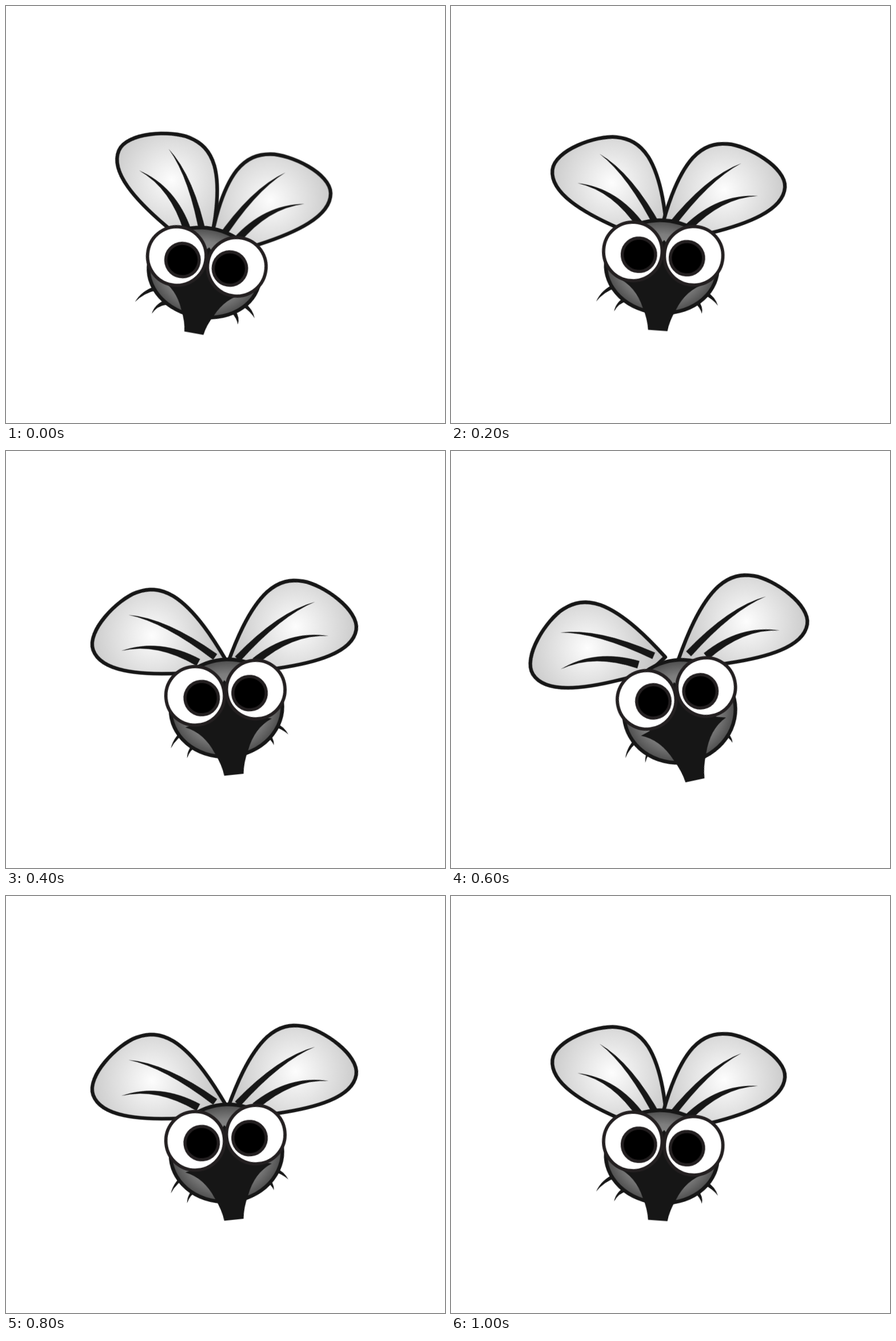
These frames come from a looping animation (768 by 729 pixels, 1200 ms). An HTML page:

```html
<!DOCTYPE html>
<html lang="en">
<head>
<meta charset="utf-8">
<title>Fly</title>
<style>
  html, body { margin: 0; width: 100%; height: 100%; overflow: hidden; background: #fff; }
  svg { display: block; width: 768px; height: 729px; }
  .ink { fill: #161616; }
  .line { stroke: #161616; stroke-width: 6.4; stroke-linejoin: round; }
  .eye { fill: #fff; stroke: #231f20; stroke-width: 5.8; }
  .pupil { fill: #000; stroke: #231f20; stroke-width: 5.5; }
</style>
</head>
<body>
<svg viewBox="0 0 768 729">
  <defs>
    <radialGradient id="wingFill" gradientUnits="userSpaceOnUse" cx="-43" cy="21" r="122">
      <stop offset="0" stop-color="#fdfdfd"/>
      <stop offset="1" stop-color="#c4c4c4"/>
    </radialGradient>
    <radialGradient id="skin">
      <stop offset="0" stop-color="#999"/>
      <stop offset=".7" stop-color="#7d7d7d"/>
      <stop offset="1" stop-color="#4c4c4c"/>
    </radialGradient>
    <g id="wing">
      <path class="line" fill="url(#wingFill)" d="M-150 106C-143 68 -130 5 -102 -31C-84 -53 -65 -59.5 -43 -59.5C-8 -59.5 62.5 -26 62.5 9C62.5 50 0 78 -62 98L-110 114Z"/>
      <path class="ink" d="M-16.5 -27.5Q-77 0 -139 90L-129 97Q-71 6 -16.5 -27.5Z"/>
      <path class="ink" d="M16.5 27.5Q-54 28 -108 88L-98 97Q-47 35 16.5 27.5Z"/>
    </g>
  </defs>

  <g id="leftWing"><use href="#wing"/></g>
  <g id="rightWing"><use href="#wing"/></g>

  <g id="head">
    <g class="ink">
      <path id="hairA" d="M-111 92Q-104 71 -80 58L-77 65Q-99 74 -111 92Z"/>
      <path id="hairB" d="M-78.5 107Q-77 91 -61 80L-56 87Q-72 92 -78.5 107Z"/>
      <path id="hairC" d="M75 100Q77 88 66 76L60 81Q71 89 75 100Z"/>
      <path id="hairD" d="M102 84Q96 69 81 61L77 67Q92 73 102 84Z"/>
    </g>
    <g id="face">
      <ellipse class="line" fill="url(#skin)" vector-effect="non-scaling-stroke" cx="-1" cy="78" rx="98" ry="78"/>
      <path class="ink" d="M0 33L-60 98L-76 102Q-44 114 -29 149Q-19 168 -17 185.5H17Q19 168 29 149Q44 114 76 102L60 98Z"/>
    </g>
    <circle class="eye" cx="-53.3" r="51.2"/>
    <circle class="eye" cx="53.3" r="51.2"/>
    <circle class="pupil" cx="-42.3" cy="5.1" r="29.2"/>
    <circle class="pupil" cx="41.9" cy="5.1" r="29.2"/>
  </g>
</svg>
<script>
  const STEP = 200;
  const ORDER = [0, 1, 2, 3, 2, 1];

  // x, y, angle for each pose
  const place = ([x, y, a]) => `translate(${x}px, ${y}px) rotate(${a}deg)`;
  const shift = ([x, y]) => `translate(${x}px, ${y}px)`;
  const stretch = s => `translate(0px, -58px) scale(1, ${s})`;
  const flip = p => place(p) + ' scale(-1, 1)';
  const still = [0, 0];

  function play(id, poses, toTransform) {
    const steps = ORDER.map((n, i) => ({
      transform: toTransform(poses[n]),
      offset: i / ORDER.length,
      easing: 'steps(1, end)'
    }));
    steps.push({ transform: toTransform(poses[0]), offset: 1 });
    document.getElementById(id).animate(steps, {
      duration: STEP * ORDER.length,
      iterations: Infinity
    });
  }

  play('head', [[351.3, 446.5, 10.2], [371.3, 432.8, 4.1], [383.9, 422.5, -5.9], [394.3, 423.8, -12.1]], place);
  play('face', [1, 1.04, 1.09, 1.15], stretch);
  play('leftWing', [[258.5, 268.5, 22.7], [240.5, 284, 5.9], [208, 318, -20], [191.5, 349.5, -31.9]], flip);
  play('rightWing', [[505.5, 318.5, 0], [522.5, 303.5, 4], [552.5, 293.5, 9.5], [563, 284, 9.3]], place);
  play('hairA', [still, still, [6, -5], still], shift);
  play('hairC', [[-2, -1], still, still, [3, 5]], shift);
  play('hairD', [[-2, -1], still, still, [-40, -30]], shift);
</script>
</body>
</html>
```
